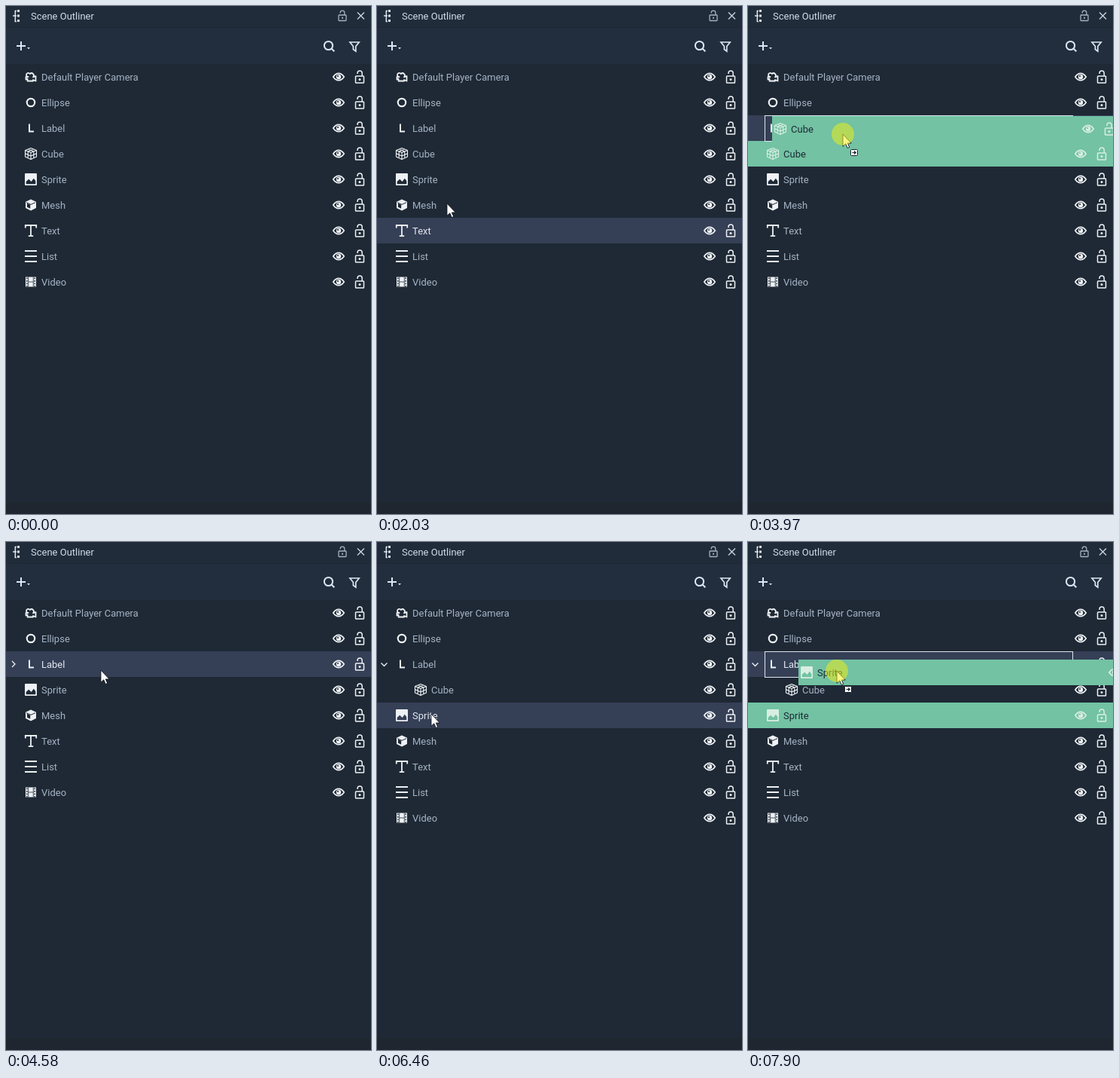
These frames come from a looping animation (485 px wide and 674 px high, 8 s). An HTML page:

```html
<!DOCTYPE html>
<html lang="en">
<head>
<meta charset="utf-8">
<title>Scene Outliner</title>
<style>
html, body { margin: 0; width: 100%; height: 100%; overflow: hidden; background: #1e2935; }
svg { display: block; }
text { font: 13px Roboto, sans-serif; }
.row { --bg: #1e2935; --ink: #eef1f5; --label: #a6b3c4; }
.row.hover { --bg: #353f56; --label: #e2e8f0; }
.row.drag { --bg: #72c2a3; --ink: #d9eee2; --label: #1e2a36; }
.row .back { fill: var(--bg); }
.row text { fill: var(--label); }
.ln { fill: none; stroke: var(--ink); }
.fl { fill: var(--ink); }
.cut { fill: var(--bg); }
.gap { fill: none; stroke: var(--bg); }
</style>
</head>
<body>
<svg id="stage" width="485" height="674" viewBox="0 0 485 674">
  <rect width="485" height="674" fill="#1e2935"/>
  <rect width="485" height="77" fill="#222e3d"/>
  <rect width="485" height="28" fill="#212c3a"/>
  <rect y="28" width="485" height="1" fill="#1e2834"/>
  <rect y="659" width="485" height="15" fill="#1f262f"/>
  <g fill="none" stroke="#dce5ef" stroke-width="1.5">
    <path d="M14 6.5H12.3V20.5H14M9 13H14"/>
    <path d="M16.5 5V8M16.5 11.5V14.5M16.5 18V21" stroke-width="3"/>
  </g>
  <text x="33" y="18" fill="#d0dbe8">Scene Outliner</text>
  <g fill="none" stroke="#a5b1c0" stroke-width="1.3">
    <rect x="442" y="12" width="10" height="7.5" rx=".8"/>
    <path d="M444.2 9.5V9A2.8 2.8 0 0 1 449.8 9V12"/>
    <path d="M447 14.7V16.7" stroke-width="1.8"/>
    <path d="M467 8.5L476 17.5M476 8.5L467 17.5" stroke="#cbd6e2"/>
  </g>
  <g fill="none" stroke="#dbe7f4" stroke-width="2">
    <path d="M14 53H26M20 47V59"/>
    <path d="M28 55H32L30 57.3Z" fill="#dbe7f4" stroke="none"/>
    <circle cx="428.5" cy="52.5" r="5.6"/>
    <path d="M432.5 56.5L436.3 60.3"/>
    <path d="M457 48H469.2L464.8 53.5V60L461.4 57.5V53.5Z" stroke-width="1.7"/>
  </g>
  <g id="rows"></g>
  <rect id="frame" x="22.5" y="145.5" width="409" height="34" fill="none" stroke="#dfe5ec"/>
  <g id="ghosts"></g>
  <g id="cursor">
    <path d="M0 0V16.3L3.8 12.8L6.3 18.5L8.8 17.4L6.4 12H11.3Z" fill="#fff" stroke="#10151c" stroke-width=".9"/>
    <g id="badge">
      <rect x="10.5" y="20.5" width="9" height="8" rx="1" fill="#fff" stroke="#18202a"/>
      <path d="M12.5 24.5H17M15 22.5L17.2 24.5L15 26.5" fill="none" stroke="#18202a" stroke-width="1.2"/>
    </g>
    <circle id="press" r="15" fill="rgb(240,238,20)" fill-opacity=".53"/>
  </g>
</svg>
<script>
const LOOP = 8000, TOP = 77, ROW = 34, LAG = 70;
const $ = id => document.getElementById(id);

// Icons are centred on 0,0.
const icons = {
  'Default Player Camera': `<path class="ln" stroke-width="1.8" stroke-linejoin="round"
    d="M-3.5 0A2.6 2.6 0 1 1 -1.2 -4A3 3 0 1 1 3 0.3L6.5 -1V5.5L3 4V5.5H-4.5V2.5L-6.5 3.5V0Z"/>`,
  Ellipse: '<circle class="ln" r="5.2" stroke-width="2.2"/>',
  Label: '<path class="ln" stroke-width="2" d="M-2 -5.5V4.5H4"/>',
  Cube: `<path class="ln" stroke-width="1.1" stroke-linejoin="round" d="M0 -7.5L7.5 -4.5V4L0 7.5L-7.5 4V-4.5Z
    M-7.5 -4.5L0 -1.5L7.5 -4.5M0 -1.5V7.5M-3.8 -6L3.8 -3V5.8M3.8 -6L-3.8 -3V5.8M-7.5 -.2L0 3L7.5 -.2"/>`,
  Sprite: `<path class="fl" fill-rule="evenodd" d="M-7 -8H7Q8 -8 8 -7V7Q8 8 7 8H-7Q-8 8 -8 7V-7Q-8 -8 -7 -8Z
    M-6.3 6.2V3L-2.8 -.2L.6 3L3.8 -1.2L6.3 2V6.2Z"/>`,
  Mesh: `<path class="fl" d="M0 -7.5L7 -4.2V4L0 7.5L-7 4V-4.2Z"/>
    <path class="cut" d="M-5 -2.2L-.8 -.3V4.8L-5 2.8Z"/>
    <path class="gap" d="M-6 -3.3L0 -.6L6 -3.3" stroke-width="1"/>`,
  Text: `<path class="ln" stroke-width="1.8" d="M-7.2 -3.5V-7H7.2V-3.5M0 -7V7M-3.2 7.2H3.2"/>`,
  List: '<path class="ln" stroke-width="2" d="M-8 -7H8M-8 0H8M-8 7H8"/>',
  Video: `<rect class="fl" x="-7" y="-6.5" width="14" height="13"/>
    <path class="gap" stroke-width="1.5" stroke-dasharray="1.8 1.7" d="M-5.2 -5.5V6.5M5.2 -5.5V6.5"/>
    <path class="gap" d="M-3.3 -6.5V6.5M3.3 -6.5V6.5M-3.3 0H3.3" stroke-width=".8"/>`
};
const names = Object.keys(icons);

const controls = `<g transform="translate(442 17)">
    <path class="ln" stroke-width="1.7" d="M-7.2 0Q-4 -4.7 0 -4.7T7.2 0Q4 4.7 0 4.7T-7.2 0Z"/>
    <circle class="fl" r="3.2"/><circle class="cut" cx="-1" cy="-1" r="1.1"/></g>
  <g transform="translate(470 17)" class="ln" stroke-width="1.5">
    <rect x="-5.5" y="-1" width="11" height="9" rx=".8"/>
    <path d="M-3 -4V-4.8A3.1 3.1 0 0 1 3.2 -4.8V-1"/>
    <circle class="fl" cy="3.5" r="1.5" stroke="none"/></g>`;

function makeRow(name, parent, left) {
  const g = document.createElementNS('http://www.w3.org/2000/svg', 'g');
  g.innerHTML = `<rect class="back" x="${left}" width="485" height="${ROW}"/>
    <g class="body"><g transform="translate(33 17)">${icons[name]}</g><text x="47" y="22">${name}</text></g>
    <path class="ln arrow" stroke-width="1.3"/>${controls}`;
  parent.append(g);
  return g;
}
const rows = {}, ghosts = {};
for (const n of names) rows[n] = makeRow(n, $('rows'), 0);
for (const n of ['Cube', 'Sprite']) {
  ghosts[n] = makeRow(n, $('ghosts'), 22);
  ghosts[n].setAttribute('class', 'row drag');
}

// Pointer path: time, x, y, easing towards this point.
const smooth = p => p * p * (3 - 2 * p);
const linear = p => p;
const path = [
  [850, 422, 672, linear],
  [1690, 266, 549, p => p ** 1.3],
  [2030, 93, 262, p => 1 - (1 - p) ** 1.5],
  [2500, 116, 203, p => 1 - (1 - p) ** 2],
  [2640, 116, 203, linear],
  [3330, 121, 187, smooth],
  [3900, 126, 170, smooth],
  [4720, 126, 170, linear],
  [4960, 105, 173, smooth],
  [5530, 14, 161, p => 1 - (1 - p) ** 1.8],
  [5930, 14, 161, linear],
  [6460, 72, 228, smooth],
  [6810, 73, 228, linear],
  [7560, 117, 173, smooth],
  [7900, 118, 171, smooth]
];
function pointer(t) {
  const i = path.findIndex(k => k[0] > t);
  if (i < 0) return path[path.length - 1].slice(1, 3);
  if (i === 0) return [500, 700];
  const [t0, x0, y0] = path[i - 1], [t1, x1, y1, ease] = path[i];
  const p = ease((t - t0) / (t1 - t0));
  return [x0 + (x1 - x0) * p, y0 + (y1 - y0) * p].map(Math.round);
}

const within = (t, a, b) => t >= a && t < b;
const show = (el, on) => el.setAttribute('display', on ? 'inline' : 'none');
const move = (el, x, y) => el.setAttribute('transform', `translate(${x} ${y})`);

const drags = [
  { name: 'Cube', from: [116, 203], green: 2780, lift: 3400, drop: 4220, end: 4390 },
  { name: 'Sprite', from: [73, 228], green: 7000, lift: 7630, drop: LOOP, end: LOOP }
];

function hoverName(t, list, drag) {
  if (t < 920) return '';
  const y = pointer(t - LAG)[1];
  if (drag) return t >= drag.lift && y < 179 ? 'Label' : '';
  if (within(t, 4390, 4580)) return 'Sprite';
  return list[Math.floor((y - TOP) / ROW)] || '';
}

function draw(t) {
  const nested = t >= 4390, open = t >= 5660;
  const list = names.filter(n => n !== 'Cube' || !nested || open);
  const drag = drags.find(d => within(t, d.green, d.end));
  const hover = hoverName(t, list, drag);
  const [x, y] = pointer(t);

  for (const n of names) {
    const g = rows[n], i = list.indexOf(n);
    show(g, i >= 0);
    move(g, 0, TOP + ROW * i);
    const state = drag && drag.name === n ? ' drag' : n === hover ? ' hover' : '';
    g.setAttribute('class', 'row' + state);
  }
  move(rows.Cube.querySelector('.body'), open ? 25 : 0, 0);
  rows.Label.querySelector('.arrow').setAttribute('d',
    !nested ? '' : open ? 'M5.5 15.5L9.5 19.5L13.5 15.5' : 'M8 13L12 17L8 21');

  const target = !!drag && hover === 'Label';
  show($('frame'), target);
  for (const d of drags) {
    show(ghosts[d.name], within(t, d.lift, d.drop));
    move(ghosts[d.name], x - d.from[0], (d.name === 'Cube' ? 179 : 213) + y - d.from[1]);
  }
  show($('cursor'), t >= 920);
  move($('cursor'), x, y);
  show($('badge'), target && t < drag.drop);
  show($('press'), within(t, 2570, 4220) || within(t, 5590, 5990) || t >= 6810);
}

const start = performance.now();
function tick() {
  draw((performance.now() - start) % LOOP);
  requestAnimationFrame(tick);
}
tick();
</script>
</body>
</html>
```
